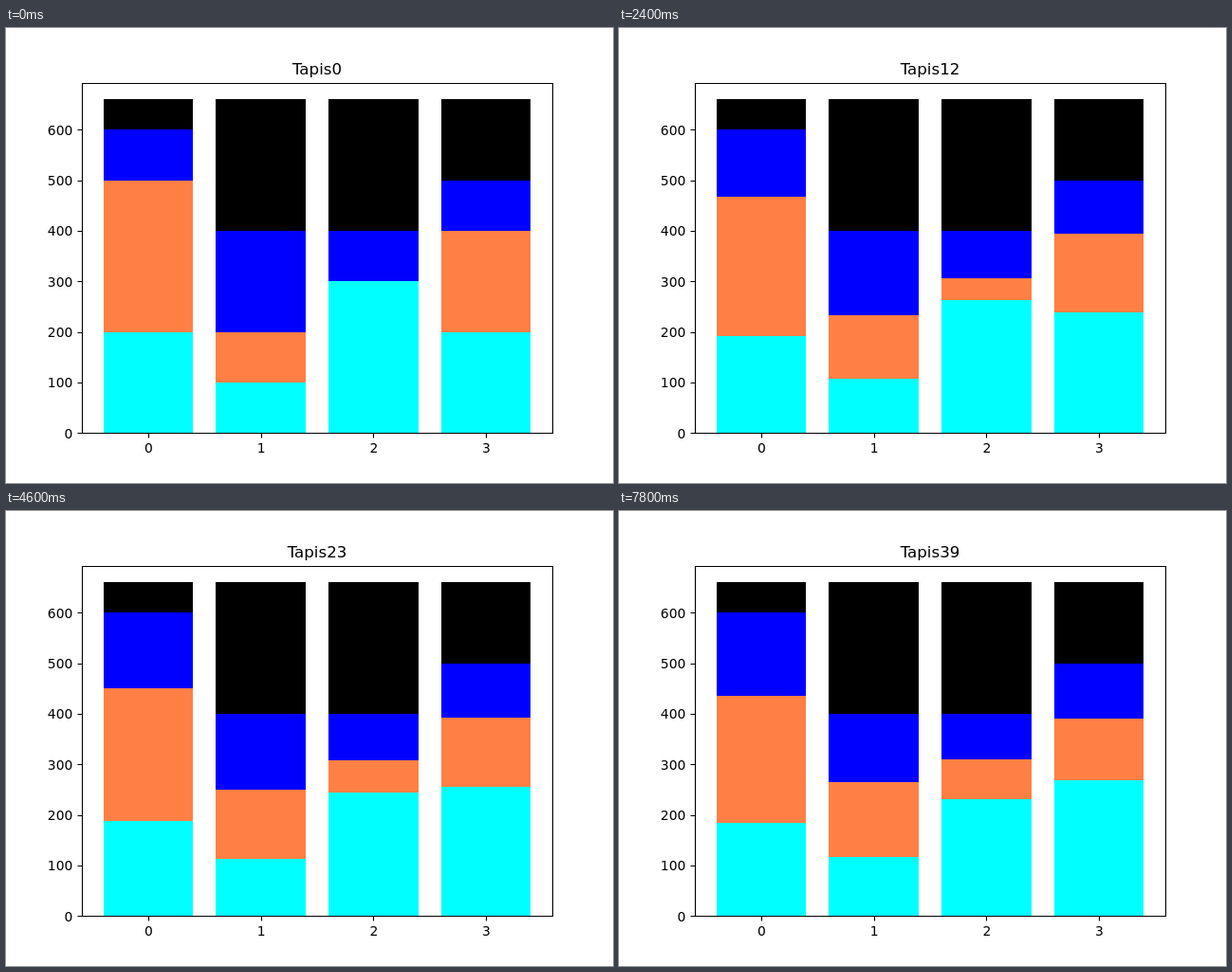
These frames come from a looping animation (640 px wide and 480 px high, 8000 ms). An HTML page:

```html
<!DOCTYPE html>
<html lang="fr">
<head>
<meta charset="utf-8">
<title>Tapis</title>
<style>
  html, body { margin: 0; width: 100%; height: 100%; overflow: hidden; background: #fff; }
  svg { display: block; width: 640px; height: 480px; }
  text { font-family: "DejaVu Sans", sans-serif; font-size: 13.889px; }
  .title { font-size: 16.667px; }
  .axis { fill: none; stroke: #000; stroke-width: 1.11; }
</style>
</head>
<body>
<svg id="stage" viewBox="0 0 640 480"></svg>
<script>
const STEP_MS = 200, STEPS = 40, FULL = 660;
const COLORS = ["#00ffff", "#ff7f44", "#0000ff", "#000000"]; // bottom to top
const START = [[200, 300, 100], [100, 100, 200], [300, 0, 100], [200, 200, 100]];
const EXCHANGES = [[0, 1, 10], [2, 3, 12]]; // bar, bar, amount swapped per step

const stage = document.getElementById("stage");
const xAt = v => 80 + (v + 0.59) * 496 / 4.18;
const yAt = v => 427.2 - v * 369.6 / 693;
const sum = list => list.reduce((a, b) => a + b, 0);

function add(tag, attrs, text = "") {
  const el = document.createElementNS("http://www.w3.org/2000/svg", tag);
  for (const key in attrs) el.setAttribute(key, attrs[key]);
  el.textContent = text;
  return stage.appendChild(el);
}

// Each pair of bars trades equal amounts, each in its own current mix.
function mix(bars) {
  const next = bars.map(bar => [...bar]);
  for (const [a, b, amount] of EXCHANGES) {
    const totalA = sum(bars[a]), totalB = sum(bars[b]);
    for (let k = 0; k < 3; k++) {
      const flow = amount * (bars[b][k] / totalB - bars[a][k] / totalA);
      next[a][k] += flow;
      next[b][k] -= flow;
    }
  }
  return next;
}

const states = [START];
while (states.length < STEPS) states.push(mix(states[states.length - 1]));

// Layers overlap: the tallest is drawn first and all reach the base line.
const layers = START.map((_, i) => {
  const x = Math.round(xAt(i - 0.4));
  const width = Math.round(xAt(i + 0.4)) - x;
  const rects = [];
  for (let k = 3; k >= 0; k--) rects[k] = add("rect", { x, width, fill: COLORS[k] });
  return rects;
});

let axis = "M80.5 58.5H576.5V427.5H80.5Z";
for (let v = 0; v <= 600; v += 100) {
  const y = Math.round(yAt(v));
  axis += `M75.5 ${y + 0.5}H80.5`;
  add("text", { x: 70.3, y: Math.round(yAt(v) + 5.31), "text-anchor": "end" }, v);
}
for (let i = 0; i < 4; i++) {
  axis += `M${Math.round(xAt(i)) + 0.5} 427.5V432.5`;
  add("text", { x: xAt(i) + 0.5, y: 448, "text-anchor": "middle" }, i);
}
add("path", { d: axis, class: "axis" });
const title = add("text", { x: 328, y: 49, class: "title", "text-anchor": "middle" });

let shown = -1;
function show(step) {
  if (step === shown) return;
  shown = step;
  title.textContent = "Tapis" + step;
  states[step].forEach((bar, i) => layers[i].forEach((rect, k) => {
    const top = k === 3 ? FULL : sum(bar.slice(0, k + 1));
    const y = Math.round(yAt(top));
    rect.setAttribute("y", y);
    rect.setAttribute("height", 427 - y);
  }));
}

const begin = performance.now();
function tick() {
  const elapsed = Math.max(0, performance.now() - begin);
  show(Math.floor(elapsed / STEP_MS) % STEPS);
  requestAnimationFrame(tick);
}
tick();
</script>
</body>
</html>
```
